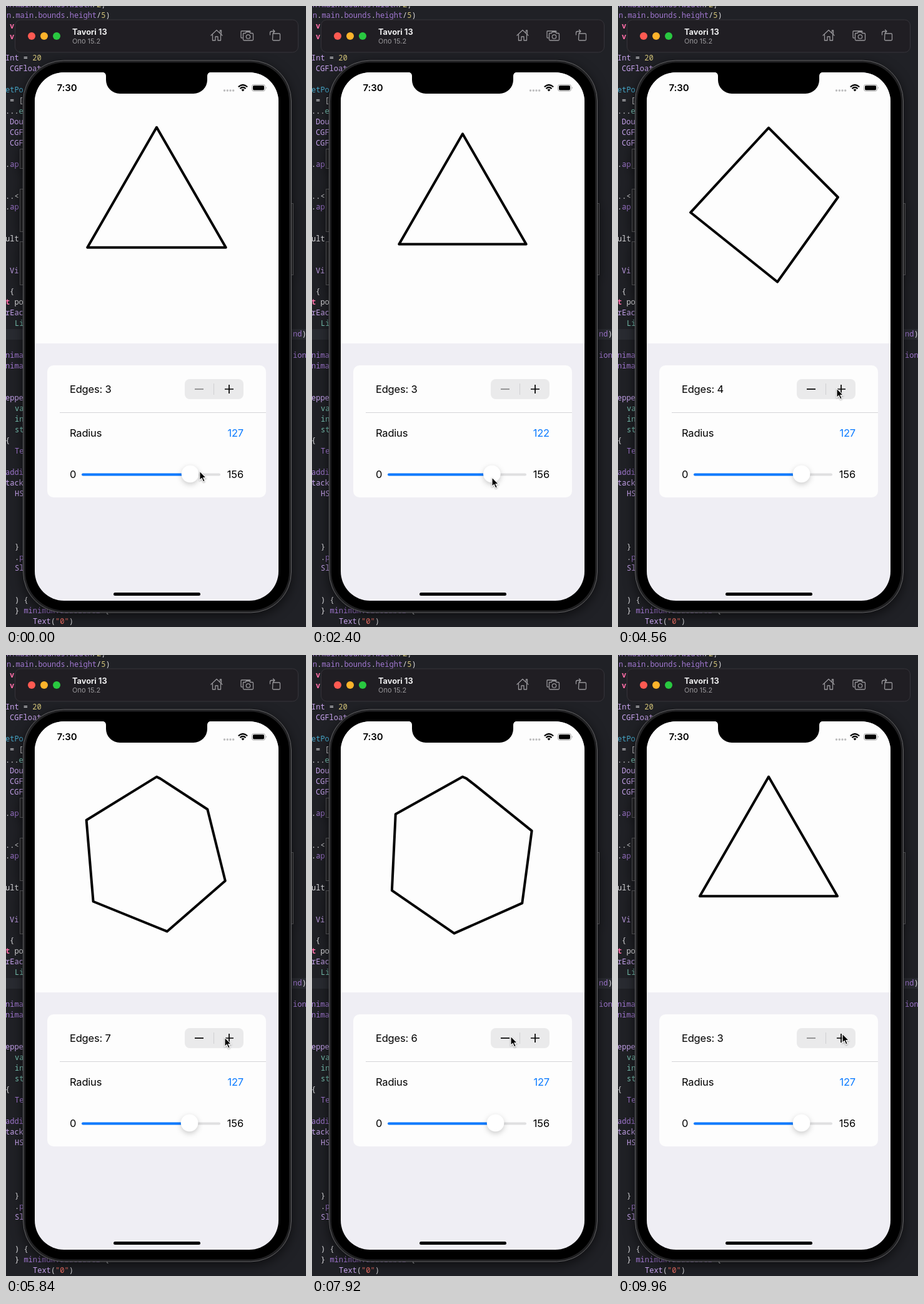
An HTML page that plays this animation: 480 px wide and 992 px high, repeating every 10000 ms.

```html
<!DOCTYPE html>
<html lang="en">
<head>
<meta charset="utf-8">
<title>Polygon edges and radius</title>
<style>
html, body { margin: 0; width: 100%; height: 100%; overflow: hidden; background: #202126; }
svg { display: block; width: 480px; height: 992px; }
text { font-family: Inter, sans-serif; white-space: pre; }
#code text { font: 500 12px "Noto Sans Mono", monospace; }
.label text { font-size: 16.5px; letter-spacing: -.2px; }
#phone { filter: drop-shadow(0 5px 9px #0009); }
#knob { filter: drop-shadow(0 3px 4px #0003); }
#cursor { filter: drop-shadow(0 1px 1px #0005); }
.line { fill: none; stroke-linecap: round; stroke-linejoin: round; }
</style>
</head>
<body>
<svg viewBox="0 0 480 992">
  <rect width="480" height="992" fill="#202126"/>
  <rect y="516" width="480" height="17" fill="#292b31"/>
  <g id="code"></g>

  <g id="phone">
    <g fill="#1c1c1e" stroke="#48484b">
      <rect x="22.5" y="228.5" width="6" height="31"/>
      <rect x="22.5" y="292.5" width="6" height="68"/>
      <rect x="22.5" y="376.5" width="6" height="69"/>
      <rect x="454.5" y="315.5" width="5" height="114"/>
    </g>
    <rect x="27.5" y="87" width="429" height="882" rx="65" fill="#202022" stroke="#626264"/>
    <rect x="31" y="90.500" width="422" height="875" rx="62"/>
    <rect x="46" y="106" width="390" height="844" rx="47" fill="#efeef4"/>
    <path d="M46 539V153a47 47 0 0 1 47-47H389a47 47 0 0 1 47 47V539z" fill="#fdfdfd"/>
    <path d="M154 105.500q6 .5 6 7V118a22 22 0 0 0 22 22H300a22 22 0 0 0 22-22V112.500q0-6.500 6-7z"/>
  </g>

  <g id="toolbar">
    <rect x="14.500" y="22" width="453" height="52" rx="9" fill="#201e23" stroke="#36343a"/>
    <circle cx="41" cy="48" r="6" fill="#fe5a52"/>
    <circle cx="61" cy="48" r="6" fill="#fdb32b"/>
    <circle cx="81" cy="48" r="6" fill="#29c840"/>
    <text x="106" y="46" font-size="12.800" font-weight="700" fill="#ededee">Tavori 13</text>
    <text x="106" y="60" font-size="11" fill="#99989b">Ono 15.2</text>
    <g class="line" stroke="#97969a" stroke-width="1.300">
      <path d="M328 47l9-8.500 9 8.500M342.500 42v-3h2v5M330.500 46v9h4.500v-6h4v6h4.500v-9"/>
      <path d="M378 51h-1q-1 0-1-1v-9q0-1 1-1h13q1 0 1 1M380 43.500h3l1.500-2h5l1.500 2h3q1.500 0 1.500 1.500v8.500q0 1.500-1.500 1.500h-13q-1.500 0-1.500-1.500v-8.500q0-1.500 .5-1.500z"/>
      <circle cx="387.500" cy="49" r="3.200"/>
      <path d="M427 44h10q1.500 0 1.500 1.500v8q0 1.500-1.500 1.500h-9q-1.500 0-1.500-1.500zM422.500 46v-3q0-2.500 2.500-2.500h5M427.500 38l2.500 2.500-2.500 2.500"/>
    </g>
  </g>

  <g id="status">
    <text x="81.500" y="136" font-size="15" font-weight="600" letter-spacing="-.1">7:30</text>
    <g fill="#bcbcbd">
      <circle cx="349.500" cy="135" r="1.700"/><circle cx="354.300" cy="135" r="1.700"/>
      <circle cx="359" cy="135" r="1.700"/><circle cx="363.700" cy="135" r="1.700"/>
    </g>
    <g class="line" stroke="#000" stroke-width="2.200" style="stroke-linecap:butt">
      <path d="M371.800 129.200q7.200-6.400 14.400 0M374.400 132q4.600-4 9.200 0"/>
    </g>
    <path d="M376.500 133.800q2.500-2 5 0L379 136.500z"/>
    <rect x="393.500" y="125.500" width="21" height="10.500" rx="3" fill="none" stroke="#a5a5a5"/>
    <rect x="395" y="127" width="18" height="7.500" rx="1.700"/>
    <path d="M416 129q2 1.700 0 3.500z" fill="#a5a5a5"/>
  </g>

  <path id="shape" class="line" stroke="#000" stroke-width="4"/>

  <rect x="66" y="574" width="350" height="211" rx="10" fill="#fdfdfd"/>
  <path d="M86 649.500H416" stroke="#d5d5d8"/>
  <rect x="286" y="596" width="94" height="32" rx="8" fill="#eaeaeb"/>
  <path d="M332.500 603V621" stroke="#d0d0d2"/>
  <path id="minus" d="M302 612H316" stroke-width="1.700"/>
  <path d="M350 612H364M357 605V619" stroke="#000" stroke-width="1.700"/>
  <g class="label">
    <text id="edges" x="102" y="618"></text>
    <text x="102" y="688">Radius</text>
    <text id="radius" x="380" y="688" text-anchor="end" fill="#0a7aff"></text>
    <text x="102" y="754">0</text>
    <text x="380" y="754" text-anchor="end">156</text>
  </g>
  <path class="line" d="M123 748.500H341" stroke="#e0e0e1" stroke-width="4"/>
  <path id="fill" class="line" stroke="#0a7aff" stroke-width="4"/>
  <circle id="knob" cy="747.500" r="13.800" fill="#fff"/>
  <rect x="172" y="937" width="139" height="5" rx="2.500"/>
  <path id="cursor" d="M0 0V14.500L3.300 11.500 5.700 17 8.300 15.900 5.900 10.600H10.400z" stroke="#fff" stroke-width="1.100"/>
</svg>

<script>
const $ = id => document.getElementById(id);
const LOOP = 10000, EASE_MS = 1000, STEPS = 300, MAX_POINTS = 9;
const CENTER = { x: 241, y: 321.7 };

// Editor text: row, x, then "colour:text" pieces.
const colors = { p: '#a278d2', l: '#c9a5f0', k: '#ff6fa9', w: '#dcdcdf', y: '#d5c67a', b: '#46a6c8', g: '#7cc9b8', s: '#fa7468' };
const code = `
-1 1 p:n.main.bounds.width w:/ y:2 w:;
0 1 p:n w:. p:main w:. p:bounds w:. p:height w:/ y:5 w:)
1 6 k:v
2 6 k:v
4 -1 l:Int w:_=_ y:20
5 6 l:CGFloat
7 -1 b:etPo
8 6 w:=_[
9 -1 w:... g:e
10 6 l:Dou
11 6 l:CGF
12 6 l:CGF
14 -1 w:. p:ap
17 -1 w:..<
18 -1 w:. p:ap
21 -1 w:ult_
24 6 l:Vi
26 6 w:{
27 -1 k:t w:_po
28 -1 l:rEac
29 14 g:Li
30 459 p:nd w:)
32 -1 p:nima
32 459 p:ion
33 -1 p:nima
36 -1 l:eppe
37 14 g:va
38 14 g:in
39 14 g:st
40 -1 w:{
41 14 p:Te
43 -1 p:addi
44 -1 l:tack
45 14 l:HS
50 14 w:}
51 14 w:. p:p
52 14 l:Sl
55 14 w:)_{
56 14 w:} p:_minimumValueLabel w:_{
57 43 l:Text w:( s:"0" w:)`;
$('code').innerHTML = code.trim().split('\n').map(row => {
  const [line, x, ...parts] = row.split(' ');
  const spans = parts.map(p =>
    `<tspan fill="${colors[p[0]]}"${p[0] === 'k' ? ' font-weight="700"' : ''}>${p.slice(2).replace(/_/g, ' ').replace(/</g, '&lt;')}</tspan>`);
  return `<text x="${x}" y="${19 + line * 16.98}">${spans.join('')}</text>`;
}).join('');

// Keyframes: time followed by values.
const sliderKeys = [[80, 127.9], [1080, 95.3], [1250, 92], [1400, 100], [1800, 118.5], [2400, 122.5], [2800, 127.1]];
const cursorKeys = [
  [0, 310, 743], [80, 304, 745], [1080, 251, 747], [1250, 248, 748], [1400, 258, 750],
  [1800, 282, 752], [2400, 288, 753], [2800, 294, 752], [3050, 296, 748], [3600, 350, 611],
  [6650, 350, 611], [6980, 318, 609], [8850, 318, 609], [9500, 359, 605]
];
const edgeChanges = [[3810, 4], [4650, 5], [5200, 6], [5670, 7], [5863, 8], [7100, 7], [7235, 6], [8050, 5], [8300, 4], [8550, 3]];

function tween(keys, time) {
  const i = keys.findIndex(k => k[0] > time);
  if (i === 0) return keys[0].slice(1);
  if (i < 0) return keys[keys.length - 1].slice(1);
  const a = keys[i - 1], b = keys[i], u = (time - a[0]) / (b[0] - a[0]);
  return a.slice(1).map((v, j) => v + (b[j + 1] - v) * u);
}
const radiusAt = time => tween(sliderKeys, time)[0];
const edgesAt = time => edgeChanges.reduce((n, [at, value]) => time >= at ? value : n, 3);

// Overlapping ease-in-out animations add up to a weighted average of past states.
const easeY = s => s * s * (3 - 2 * s);
const easeX = s => 3 * s * (1 - s) * (.42 * (1 - s) + .58 * s) + s ** 3;
const history = Array.from({ length: STEPS }, (_, i) => ({
  delay: EASE_MS * easeX((i + .5) / STEPS),
  weight: easeY((i + 1) / STEPS) - easeY(i / STEPS)
}));

function polygon(time) {
  const points = Array.from({ length: MAX_POINTS }, () => [CENTER.x, CENTER.y]);
  for (const { delay, weight } of history) {
    const n = edgesAt(time - delay), r = radiusAt(time - delay) * weight;
    points.forEach((p, k) => {
      const angle = k < n ? 2 * Math.PI * k / n : 0;
      p[0] -= r * Math.sin(angle);
      p[1] -= r * Math.cos(angle);
    });
  }
  return 'M' + points.map(p => p.map(v => v.toFixed(2))).join('L') + 'z';
}

function draw(now) {
  const time = now % LOOP;
  const radius = radiusAt(time), edges = edgesAt(time);
  const knobX = 135.5 + radius / 156 * 194;
  const [x, y] = tween(cursorKeys, time);
  $('shape').setAttribute('d', polygon(time));
  $('edges').textContent = 'Edges: ' + edges;
  $('radius').textContent = Math.floor(radius);
  $('minus').setAttribute('stroke', edges > 3 ? '#000' : '#868687');
  $('fill').setAttribute('d', `M123 748.5H${knobX}`);
  $('knob').setAttribute('cx', knobX);
  $('cursor').setAttribute('transform', `translate(${x} ${y})`);
  requestAnimationFrame(draw);
}
draw(performance.now());
</script>
</body>
</html>
```
